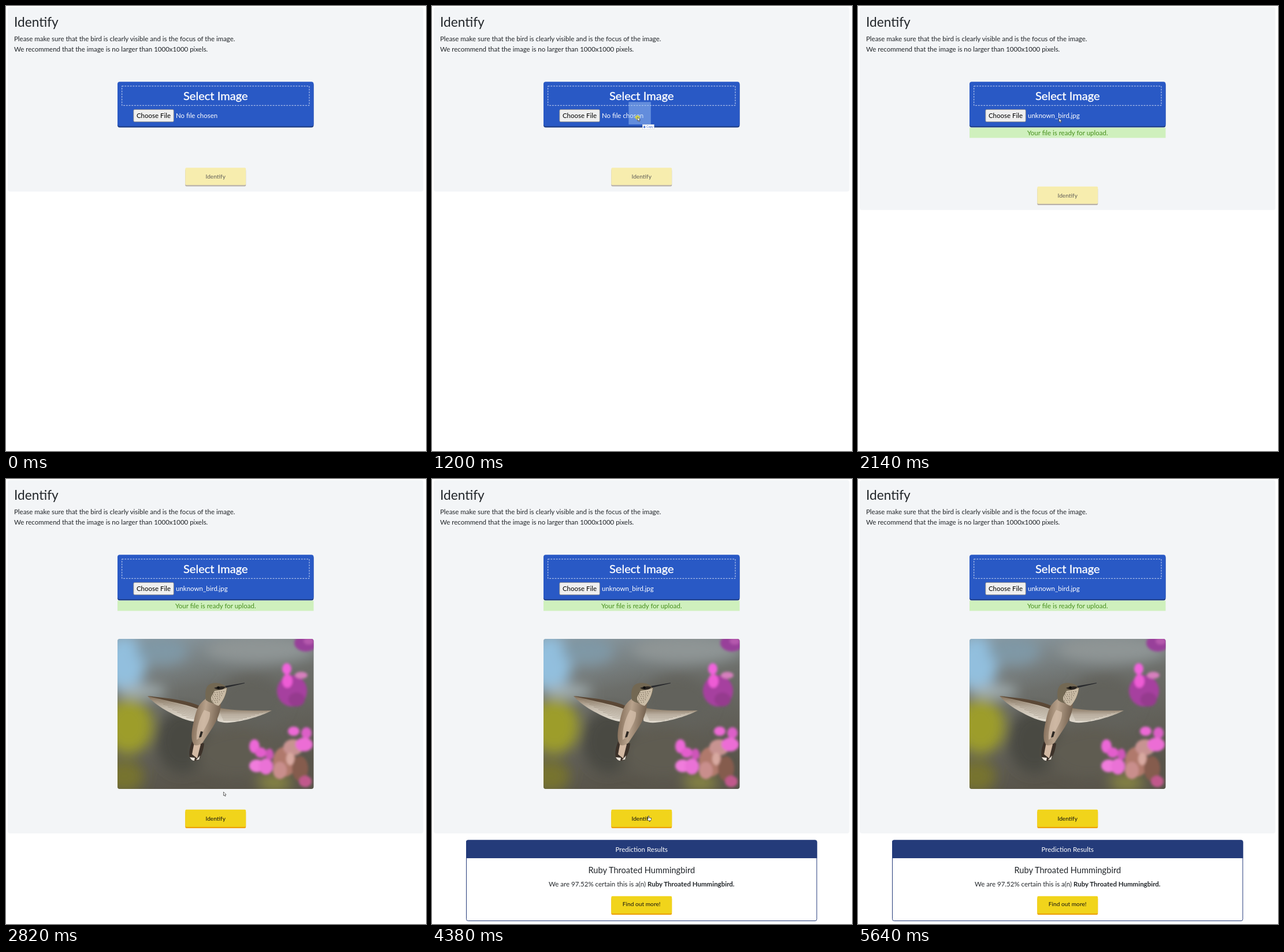
Write an HTML page that moves like this. It is 727 px wide and 771 px high and loops after 8 s.

```html
<!DOCTYPE html>
<html lang="en">
<head>
<meta charset="utf-8">
<title>Identify</title>
<style>
  html, body { margin: 0; width: 100%; height: 100%; overflow: hidden; background: #fff; }
  svg { display: block; width: 100%; height: 100%; }
  text { font-family: Lato, "Open Sans", sans-serif; font-size: 11.5px; fill: #212529; }
  .mid { text-anchor: middle; }
  .light { fill: #fff; }
  .btn { font-size: 10.2px; text-anchor: middle; }
</style>
</head>
<body>
<svg viewBox="0 0 727 771" preserveAspectRatio="none">
  <defs>
    <clipPath id="frame"><rect x="193" y="277" width="339.5" height="260" rx="4"/></clipPath>
    <linearGradient id="sky" x1="0" y1="0" x2=".25" y2="1">
      <stop offset="0" stop-color="#8b9ba4"/>
      <stop offset=".4" stop-color="#6c6e6a"/>
      <stop offset="1" stop-color="#58544a"/>
    </linearGradient>
    <linearGradient id="body" x1="0" y1="0" x2="1" y2=".2">
      <stop offset="0" stop-color="#76604c"/>
      <stop offset=".5" stop-color="#b8a28c"/>
      <stop offset="1" stop-color="#72604e"/>
    </linearGradient>
    <linearGradient id="wing" x1="0" y1="0" x2="0" y2="1">
      <stop offset="0" stop-color="#83705a"/>
      <stop offset=".45" stop-color="#c4baab"/>
      <stop offset="1" stop-color="#e3ddd2"/>
    </linearGradient>
    <filter id="soft" x="-60%" y="-60%" width="220%" height="220%"><feGaussianBlur stdDeviation="11"/></filter>
    <filter id="haze" x="-60%" y="-60%" width="220%" height="220%"><feGaussianBlur stdDeviation="2"/></filter>
    <filter id="plume" x="-20%" y="-20%" width="140%" height="140%"><feGaussianBlur stdDeviation=".6"/></filter>
  </defs>

  <rect id="panel" x="3" y="2" width="719.5" height="319" rx="4" fill="#f3f5f7"/>
  <text x="14" y="36" style="font-size:22.7px">Identify</text>
  <text x="14" y="60.5">Please make sure that the bird is clearly visible and is the focus of the image.</text>
  <text x="14" y="78.5">We recommend that the image is no larger than 1000x1000 pixels.</text>

  <rect x="193" y="133" width="339.5" height="77.5" rx="4" fill="#1f3f86"/>
  <rect x="193" y="131.3" width="339.5" height="77" rx="4" fill="#2959c5"/>
  <rect x="200.7" y="138.8" width="324.3" height="33.5" fill="none" stroke="#fff" stroke-width=".9" stroke-dasharray="2.8 1.9" opacity=".85"/>
  <text class="mid light" x="362.8" y="163" style="font-size:20.1px;stroke:#fff;stroke-width:.35">Select Image</text>
  <rect x="220.8" y="179.3" width="69.5" height="21.4" rx="2" fill="#efefef" stroke="#858585" stroke-width=".9"/>
  <text class="mid" x="255.5" y="194" style="fill:#000">Choose File</text>
  <text id="file" class="light" x="294" y="194"></text>

  <g id="ready">
    <rect x="193" y="210.7" width="339.5" height="17.8" fill="#cff0bd"/>
    <text class="mid" x="362.8" y="224" style="fill:#468f1d">Your file is ready for upload.</text>
  </g>

  <g id="photo" clip-path="url(#frame)">
    <rect x="193" y="277" width="340" height="260" fill="url(#sky)"/>
    <g id="blurs" filter="url(#soft)"></g>
    <g id="petals" filter="url(#haze)"></g>
    <g>
      <path d="M340 396C320 386 285 381 245 376C256 389 272 399 290 408C306 416 322 422 335 420Z" fill="url(#wing)"/>
      <path d="M366 396C390 401 425 402 460 401C446 409 420 417 401 420C386 423 374 423 366 419Z" fill="url(#wing)"/>
      <path id="feathers" fill="none" stroke="#877967" stroke-width=".8" opacity=".6"/>
      <path d="M245 376C285 380 320 384 341 396L338 401C318 391 280 385 245 376Z" fill="#5b4836"/>
      <path d="M322 455C317 468 316 478 319 485Q326 490 333 487C339 478 342 468 343 458Z" fill="#3c3129"/>
      <path d="M326 456L322 477L331 484L337 460Z" fill="#d3b9a3"/>
      <path d="M318 482Q321 488 326 488L327 483ZM329 487L334 486L336 479Z" fill="#eee6dc"/>
      <path d="M347 380C333 389 329 401 325 420C320 440 320 454 326 461Q335 463 341 456C349 443 359 430 366 415C372 401 373 389 371 380Z" fill="url(#body)"/>
      <path d="M343 400C334 416 329 434 330 452Q337 448 342 436C349 424 354 414 353 404Z" fill="#d6c0ac" opacity=".75" filter="url(#plume)"/>
      <path d="M337 437l4 1-3 9-4 1z" fill="#2d2823"/>
      <path d="M346 383C344 370 345 358 355 354.5C366 351 377 355 383 362C382 372 377 383 371 389Q356 391 346 383Z" fill="#736853"/>
      <path d="M361 367Q374 365 382 362C381 374 375 386 368 393Q354 389 355 378Z" fill="#c9bba5" filter="url(#plume)"/>
      <path id="spots" fill="none" stroke="#55483a" stroke-width="1.2" stroke-dasharray="1.3 2.6" opacity=".8"/>
      <path d="M360 362Q369 358 380 360L376 364Q367 367 360 362Z" fill="#2a2521"/>
      <path d="M379 358.8L413 353L413 354L381 361.5Z" fill="#292a2d"/>
      <circle cx="367.5" cy="361.5" r="2.2" fill="#0d0c0b"/>
    </g>
  </g>

  <g id="identify">
    <rect id="edge" x="310.3" y="283" width="104.9" height="29.5" rx="2"/>
    <rect id="face" x="310.3" y="280.3" width="104.9" height="30" rx="2"/>
    <text id="label" class="btn" x="362.7" y="299">Identify</text>
  </g>

  <g id="busy">
    <text class="mid" x="362.8" y="586">Processing your image. Please wait...</text>
    <path id="spin" d="M370.2 607.6A10.5 10.5 0 1 0 370.2 622.4" fill="none" stroke="#212529" stroke-width="3"/>
  </g>

  <g id="results">
    <rect x="59.5" y="626" width="606.5" height="139.5" rx="3" fill="#fff" stroke="#243b7a"/>
    <path d="M59 657V629Q59 625.5 62 625.5H663.5Q666.5 625.5 666.5 629V657Z" fill="#243b7a"/>
    <text class="mid light" x="362.8" y="645.5">Prediction Results</text>
    <text class="mid" x="362.8" y="683" style="font-size:14.6px">Ruby Throated Hummingbird</text>
    <text class="mid" x="362.8" y="706">We are 97.52% certain this is a(n) <tspan font-weight="700">Ruby Throated Hummingbird.</tspan></text>
    <rect x="310.3" y="725.5" width="104.9" height="29.5" rx="2" fill="#eda20c"/>
    <rect x="310.3" y="722.8" width="104.9" height="30" rx="2" fill="#f1d41b"/>
    <text class="btn" x="362.7" y="739.5" style="fill:#111">Find out more!</text>
  </g>

  <g id="pointer">
    <g id="drag">
      <rect x="-15.5" y="-26.5" width="38.5" height="39" fill="#a9cdf5" opacity=".45"/>
      <path d="M-5 0L-1-4L4-1L3 4L-2 4Z" fill="#d3d33f" opacity=".9"/>
      <rect x="8.5" y="12.5" width="20" height="8.5" fill="#fff" stroke="#c8ced8" stroke-width=".5"/>
      <path d="M11.8 14.8v4M9.8 16.8h4" stroke="#2959c5" stroke-width="1.3"/>
      <text x="15.5" y="18.7" style="font-size:5px;fill:#2959c5">Copy</text>
    </g>
    <path id="arrow" d="M0 0V6.5L1.5 5.2L2.6 7.6L3.7 7.1L2.7 4.8H4.7Z" fill="#fff" stroke="#333" stroke-width=".7"/>
    <path id="hand" d="M-.8 0Q0-1 .8 0V3L4 3.6Q4.8 4 4.5 5.5L3.7 8H-.2L-2.5 5Q-2.5 4-.8 4.6Z" fill="#fff" stroke="#333" stroke-width=".7"/>
  </g>
</svg>
<script>
const LOOP = 8000;
const DROP = 1340, READY = 1590, PHOTO = 2210, BUSY = 3820, DONE = 4240, GONE = 5640;
const $ = id => document.getElementById(id);
const set = (el, attrs) => { for (const k in attrs) el.setAttribute(k, attrs[k]); };
const show = (id, on) => { $(id).style.display = on ? "" : "none"; };

function ellipses(id, rows) {
  for (const [cx, cy, rx, ry, fill] of rows) {
    const el = document.createElementNS("http://www.w3.org/2000/svg", "ellipse");
    set(el, { cx, cy, rx, ry, fill });
    $(id).append(el);
  }
}

ellipses("blurs", [
  [440, 295, 95, 24, "#8f9595"],
  [205, 320, 36, 48, "#92bfde"],
  [270, 298, 45, 24, "#7f98a6"],
  [235, 368, 42, 12, "#a3b0b3"],
  [425, 385, 60, 45, "#62625c"],
  [305, 455, 45, 55, "#484942"],
  [400, 475, 70, 45, "#5f5b51"],
  [212, 428, 42, 48, "#9d9d2b"],
  [205, 515, 34, 28, "#77732f"],
  [465, 526, 30, 14, "#8b8942"]
]);
ellipses("petals", [
  [519, 284, 20, 15, "#98419a"],
  [524, 281, 9, 6, "#b558ad"],
  [495, 367, 26, 27, "#a63f9f"],
  [503, 382, 14, 12, "#953a8e"],
  [486, 329, 8, 10, "#f163dc"],
  [487, 350, 9, 12, "#ee5bd5"],
  [511, 340, 11, 6, "#d77fbd"],
  [482, 490, 20, 26, "#b0796c"],
  [497, 465, 17, 14, "#c79391"],
  [474, 505, 12, 15, "#c98e8c"],
  [509, 502, 14, 22, "#855c4e"],
  [492, 485, 7, 11, "#d8a9a0"],
  [430, 463, 9, 12, "#ec67d7"],
  [441, 474, 10, 9, "#e45dcd"],
  [434, 497, 13, 11, "#f07bdc"],
  [450, 498, 12, 14, "#ea72d6"],
  [456, 477, 7, 10, "#cf55ba"],
  [498, 437, 10, 8, "#ee69d6"],
  [520, 440, 9, 10, "#dd5fc8"],
  [516, 460, 15, 12, "#ec6dd5"],
  [518, 524, 11, 10, "#c1588c"]
]);

let d = "";
for (let i = 0; i < 8; i++) {
  d += `M${336 - i} ${401 + i * 2}L${256 + i * 8} ${381 + i * 4.6}`;
  d += `M${369 + i} ${402 + i * 2.3}L${452 - i * 7} ${402 + i * 2.3}`;
}
$("feathers").setAttribute("d", d);

d = "";
for (let i = 0; i < 6; i++) d += `M${357 + i % 2} ${371 + i * 3.4}L${378 - i * 2} ${368 + i * 3.6}`;
$("spots").setAttribute("d", d);

// Pointer tip: time, x, y
const path = [
  [500, 715, 575], [850, 443, 310], [1130, 366, 206], [1200, 356, 193],
  [1270, 347, 176], [1590, 347, 176], [1730, 348, 193], [2140, 348, 194],
  [2380, 356, 352], [2820, 376.5, 542], [3150, 374, 580], [3410, 375, 584],
  [4590, 375, 584], [5000, 389, 625], [5450, 412, 697], [5520, 427, 740],
  [5600, 442, 768]
];

function tipAt(t) {
  let i = 1;
  while (i < path.length - 1 && path[i][0] < t) i++;
  const [t0, x0, y0] = path[i - 1], [t1, x1, y1] = path[i];
  const k = Math.min(1, Math.max(0, (t - t0) / (t1 - t0)));
  return [x0 + (x1 - x0) * k, y0 + (y1 - y0) * k];
}

function render(t) {
  const ready = t >= READY, photo = t >= PHOTO, busy = t >= BUSY && t < DONE;
  const bottom = busy ? 642 : photo ? 614 : ready ? 353.5 : 321.5;
  $("panel").setAttribute("height", bottom - 2);
  $("file").textContent = ready ? "unknown_bird.jpg" : "No file chosen";
  show("ready", ready);
  show("photo", photo);
  show("busy", busy);
  show("results", t >= DONE);

  show("identify", !busy);
  set($("identify"), { transform: `translate(0 ${photo ? 292.5 : ready ? 32.5 : 0})` });
  set($("face"), { fill: photo ? "#f1d41b" : "#f7edae" });
  set($("edge"), { fill: photo ? "#eda20c" : "#b9b1aa" });
  $("label").style.fill = photo ? "#111" : "#625f59";
  set($("spin"), { transform: `rotate(${(t - 3945) / 750 * 360} 362.8 615)` });

  const [x, y] = tipAt(t);
  const hover = photo && y > 573 && y < 605;
  show("pointer", t >= 500 && t < GONE && !busy);
  show("drag", t < DROP);
  show("arrow", !hover);
  show("hand", hover);
  set($("pointer"), { transform: `translate(${x} ${y})` });
}

const start = performance.now();
function tick() {
  render((performance.now() - start) % LOOP);
  requestAnimationFrame(tick);
}
tick();
</script>
</body>
</html>
```
